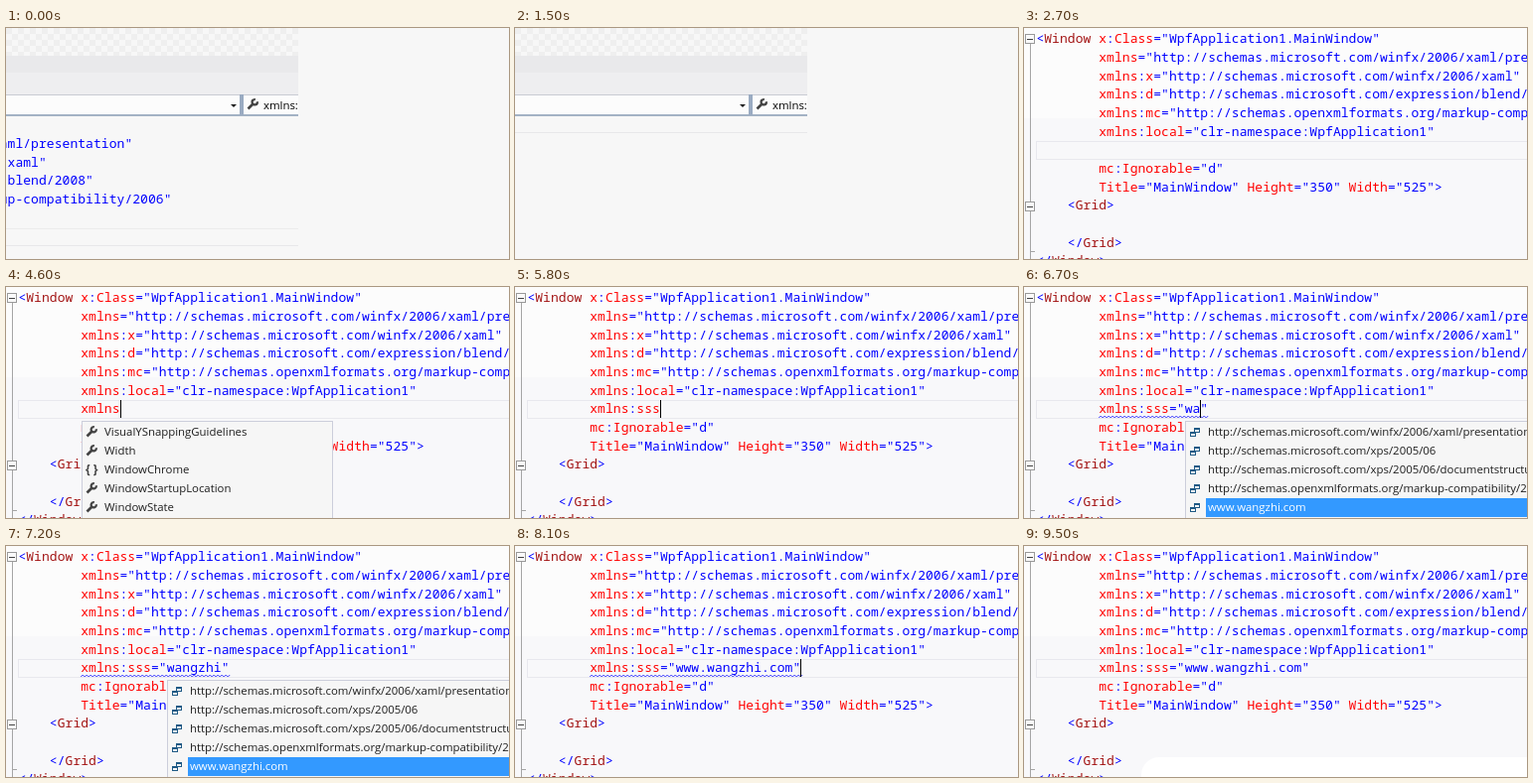
An HTML page with a canvas that plays this animation: 506 px wide and 233 px high, repeating every 9.6 s.

```html
<!DOCTYPE html>
<html>
<head>
<meta charset="utf-8">
<style>
html, body { margin: 0; width: 100%; height: 100%; overflow: hidden; background: #f7f7f7; }
canvas { display: block; }
</style>
</head>
<body>
<canvas id="stage" width="506" height="233"></canvas>
<script>
const W = 506, H = 233, LOOP = 9600;
const CHAR = 7.855, LINE = 18.67, LEFT = 12.4;
const CODE_FONT = '13px "Noto Sans Mono", "DejaVu Sans Mono", monospace';
const UI_FONT = '11.4px "Open Sans", "Noto Sans", sans-serif';
const ctx = document.getElementById('stage').getContext('2d');

const code = [
  '<Window x:Class="WpfApplication1.MainWindow"',
  '        xmlns="http://schemas.microsoft.com/winfx/2006/xaml/presentation"',
  '        xmlns:x="http://schemas.microsoft.com/winfx/2006/xaml"',
  '        xmlns:d="http://schemas.microsoft.com/expression/blend/2008"',
  '        xmlns:mc="http://schemas.openxmlformats.org/markup-compatibility/2006"',
  '        xmlns:local="clr-namespace:WpfApplication1"',
  '',
  '        mc:Ignorable="d"',
  '        Title="MainWindow" Height="350" Width="525">',
  '    <Grid>',
  '',
  '    </Grid>',
  '</Window>'
];

const ms = 'http://schemas.microsoft.com/';
const popups = {
  members: { x: 76, w: 253, icon: wrench, items: [
    'VisualYSnappingGuidelines', 'Width', 'WindowChrome', 'WindowStartupLocation', 'WindowState'] },
  first: { x: 162, w: 360, icon: namespaceIcon, outlined: 0, items: [
    ms + 'expression/blend/2008', ms + 'netfx/2007/xaml/presentation',
    ms + 'netfx/2009/xaml/presentation', ms + 'winfx/2006/xaml',
    ms + 'winfx/2006/xaml/composite-font'] },
  last: { x: 162, w: 360, icon: namespaceIcon, selected: 4, items: [
    ms + 'winfx/2006/xaml/presentation', ms + 'xps/2005/06',
    ms + 'xps/2005/06/documentstructure',
    'http://schemas.openxmlformats.org/markup-compatibility/2006', 'www.wangzhi.com'] }
};

// [start, typed text with | as visible caret, popup, squiggle]
const done = 'xmlns:sss="www.wangzhi.com"';
const steps = [
  [2700, ''], [3300, '|'], [3800, ''],
  [4000, 'x|'], [4100, 'x|', 'members'], [4200, 'xm|', 'members'],
  [4300, 'xml|', 'members'], [4400, 'xmln|', 'members'],
  [4600, 'xmlns|', 'members'], [4800, 'xmlns', 'members'],
  [5000, 'xmlns:|', 'members'], [5200, 'xmlns:', 'members'],
  [5500, 'xmlns:s|'], [5700, 'xmlns:ss|'], [5800, 'xmlns:sss|'],
  [6200, 'xmlns:sss=|'], [6300, 'xmlns:sss="|"'], [6400, 'xmlns:sss="|"', 'first'],
  [6500, 'xmlns:sss="|"', 'first', true],
  [6600, 'xmlns:sss="w|"', 'last', true], [6700, 'xmlns:sss="wa|"', 'last', true],
  [6800, 'xmlns:sss="wan|"', 'last', true], [6900, 'xmlns:sss="wang|"', 'last', true],
  [7100, 'xmlns:sss="wangzh|"', 'last', true], [7200, 'xmlns:sss="wangzhi"', 'last', true],
  [7600, done + '|', '', true], [7700, done, '', true],
  [8100, done + '|', '', true], [8600, done, '', true],
  [8900, done], [9100, done + '|'], [9500, done]
];

function rect(x, y, w, h, color) {
  ctx.fillStyle = color;
  ctx.fillRect(x, y, w, h);
}

function frame(x, y, w, h, color) {
  ctx.strokeStyle = color;
  ctx.lineWidth = 1;
  ctx.strokeRect(x + .5, y + .5, w - 1, h - 1);
}

function codeText(str, x, y) {
  ctx.font = CODE_FONT;
  ctx.letterSpacing = '0.055px';
  let prev = '';
  for (const m of str.matchAll(/"[^"]*"?|\w+|[^\s\w"]+/g)) {
    const name = /^\w/.test(m[0]);
    ctx.fillStyle = !name ? '#0000ff' : prev[0] === '<' ? '#a31515' : '#ff0000';
    ctx.fillText(m[0], x + m.index * CHAR, y);
    prev = m[0];
  }
  ctx.letterSpacing = '0px';
}

function uiText(str, x, y, color) {
  ctx.font = UI_FONT;
  ctx.fillStyle = color;
  ctx.fillText(str, x, y);
}

function wrench(x, y) {
  ctx.strokeStyle = '#424242';
  ctx.lineWidth = 2.6;
  ctx.beginPath();
  ctx.moveTo(x - 4.5, y + 4.5);
  ctx.lineTo(x + 1, y - 1);
  ctx.stroke();
  ctx.lineWidth = 2.2;
  ctx.beginPath();
  ctx.arc(x + 2.2, y - 2.2, 2.6, -.25, Math.PI * 1.5 + .25);
  ctx.stroke();
}

function namespaceIcon(x, y) {
  for (const [dx, dy] of [[-1, -4], [-5, 0]]) {
    rect(x + dx, y + dy, 6, 5, '#f6f6f6');
    frame(x + dx, y + dy, 6, 5, '#1f5a85');
    rect(x + dx, y + dy, 6, 2, '#1f5a85');
  }
}

function drawPopup(p) {
  rect(p.x, 135, p.w, 110, '#f6f6f6');
  frame(p.x, 135, p.w, 110, '#cccedb');
  p.items.forEach((item, i) => {
    const mid = 146 + i * 19;
    if (i === p.selected) rect(p.x + 21, mid - 9, p.w - 22, 19, '#3399ff');
    if (i === p.outlined) {
      rect(p.x + 20, mid - 9, p.w - 21, 19, '#fdfdfd');
      frame(p.x + 20, mid - 9, p.w - 21, 19, '#3399ff');
    }
    if (item === 'WindowChrome') {
      ctx.font = 'bold 12px "Open Sans", sans-serif';
      ctx.fillStyle = '#424242';
      ctx.fillText('{ }', p.x + 4, mid + 4);
    } else p.icon(p.x + 10, mid);
    uiText(item, p.x + 23, mid + 4, i === p.selected ? '#fff' : '#1e1e1e');
  });
}

function drawGutter() {
  rect(6, 16, 1, H, '#a5a5a5');
  rect(6, 225, 5, 1, '#a5a5a5');
  for (const y of [11, 180]) {
    rect(1, y - 5, 10, 10, '#fafafa');
    frame(1, y - 5, 10, 10, '#999');
    rect(3, y, 6, 1, '#444');
  }
}

function drawSquiggle(x, end) {
  ctx.strokeStyle = '#3f3fff';
  ctx.lineWidth = 1;
  ctx.beginPath();
  for (let i = 0; x + i * 2 <= end; i++) ctx.lineTo(x + i * 2, i % 2 ? 130 : 132);
  ctx.stroke();
}

function drawEditor(t) {
  const [, typed, popup, squiggle] = steps.findLast(s => s[0] <= t);
  const x = LEFT + 8 * CHAR, text = typed.replace('|', ''), caret = typed.indexOf('|');
  rect(0, 0, W, 91, '#fcfcfc');
  rect(0, 91, W, H, '#f8f8fa');
  frame(12, 114, W, 19, '#e8e8ee');
  drawGutter();
  code.forEach((line, i) => codeText(line, LEFT, Math.round(15.4 + i * LINE)));
  codeText(text, x, 127);
  if (squiggle) drawSquiggle(x, x + text.length * CHAR + 2);
  if (popup) drawPopup(popups[popup]);
  if (caret >= 0) rect(Math.round(x + caret * CHAR), 114, 1, 18, '#000');
  if (t >= 8600) {
    const top = t < 9100 ? 225 : t < 9200 ? 219 : 213;
    ctx.fillStyle = '#fff';
    ctx.beginPath();
    ctx.roundRect(118, top, 420, 60, 18);
    ctx.fill();
  }
}

function drawToolbar(t) {
  rect(0, 0, W, H, '#f7f7f7');
  ctx.save();
  ctx.beginPath();
  ctx.rect(0, 0, 294, H);
  ctx.clip();
  for (let y = 0; y < 5; y++)
    for (let i = y % 2; i < 50; i += 2) rect(i * 6, y * 6, 6, 6, '#efefef');
  rect(0, 28, 294, 17, '#e9e9eb');
  rect(0, 45, 294, 22, '#eeeef0');

  rect(235, 67, 59, 21, '#fcfcfc');
  rect(235, 67, 59, 1, '#c9cbd3');
  rect(235, 87, 59, 2, '#a3b2c4');
  if (t < 2300) {
    ctx.globalAlpha = t < 2200 ? 1 : .5;
    rect(0, 67, 235, 21, '#fcfcfc');
    rect(0, 67, 235, 1, '#c9cbd3');
    rect(0, 87, 235, 2, '#a3b2c4');
    ctx.fillStyle = '#1e1e1e';
    ctx.beginPath();
    ctx.moveTo(226, 77);
    ctx.lineTo(232, 77);
    ctx.lineTo(229, 80);
    ctx.fill();
    ctx.globalAlpha = 1;
  }
  rect(235, 67, 4, 21, '#9aabc2');
  wrench(248, 77);
  uiText('xmlns:', 259, 82, '#000');

  if (t < 1500) {
    ctx.font = CODE_FONT;
    ctx.fillStyle = '#0000ff';
    ctx.letterSpacing = '0.055px';
    ['aml/presentation"', '/xaml"', '/blend/2008"', 'up-compatibility/2006"'].forEach(
      (s, i) => ctx.fillText(s, -6.3, Math.round(121 + i * LINE)));
    ctx.letterSpacing = '0px';
    rect(0, 202, 294, 1, '#ececec');
    rect(0, 219, 294, 1, '#e8e8ea');
  } else if (t < 1900) rect(0, 105, 294, 1, '#e8e8ea');
  ctx.restore();
}

function draw(now) {
  const t = (now - start) % LOOP;
  (t < 2700 ? drawToolbar : drawEditor)(t);
}

const start = performance.now();
function tick() {
  draw(performance.now());
  requestAnimationFrame(tick);
}
tick();
</script>
</body>
</html>
```
